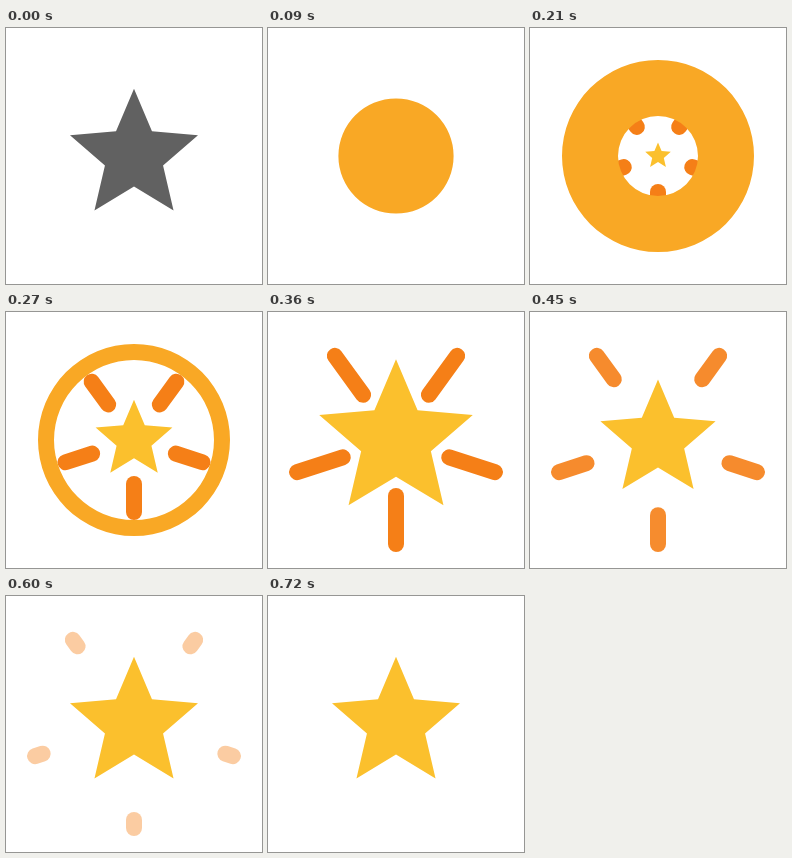
An HTML page with a canvas that plays this animation: 256x256 px, repeating every 1.24 s.

```html
<!DOCTYPE html>
<html lang="en">
<head>
<meta charset="utf-8">
<title>Star burst</title>
<style>
  html, body { margin: 0; height: 100%; overflow: hidden; background: #fff; }
  canvas { display: block; width: 100vw; height: 100vh; }
</style>
</head>
<body>
<canvas id="stage"></canvas>
<script>
const LOOP = 1240, STEP = 30, SIZE = 256;
const canvas = document.getElementById('stage');
const ctx = canvas.getContext('2d');
const starPath = new Path2D('M12 17.27L18.18 21l-1.64-7.03L22 9.24l-7.19-.61L12 2 9.19 8.63 2 9.24l5.46 4.73L5.82 21z');

// Linear track through [time, value] pairs, held at both ends
function track(t, ...keys) {
  if (t <= keys[0][0]) return keys[0][1];
  for (let i = 1; i < keys.length; i++) {
    const [t0, v0] = keys[i - 1], [t1, v1] = keys[i];
    if (t < t1) return v0 + (v1 - v0) * (t - t0) / (t1 - t0);
  }
  return keys[keys.length - 1][1];
}

function star(scale, color) {
  if (scale <= 0) return;
  ctx.save();
  ctx.scale(6.4 * scale, 6.4 * scale);
  ctx.translate(-12, -12.5);
  ctx.fillStyle = color;
  ctx.fill(starPath);
  ctx.restore();
}

function rays(inner, outer, alpha) {
  ctx.save();
  ctx.globalAlpha = alpha;
  ctx.strokeStyle = '#f57f17';
  ctx.lineWidth = 16;
  ctx.lineCap = 'round';
  for (let i = 0; i < 5; i++) {
    ctx.beginPath();
    ctx.moveTo(0, inner);
    ctx.lineTo(0, outer);
    ctx.stroke();
    ctx.rotate(Math.PI * 2 / 5);
  }
  ctx.restore();
}

function ring(outer, inner) {
  if (inner >= outer) return;
  ctx.beginPath();
  ctx.arc(0, 0, outer, 0, Math.PI * 2);
  ctx.moveTo(inner, 0);
  ctx.arc(0, 0, inner, 0, Math.PI * 2, true);
  ctx.fillStyle = '#f9a825';
  ctx.fill();
}

function draw(t) {
  const ratio = devicePixelRatio || 1;
  const w = Math.round(innerWidth * ratio), h = Math.round(innerHeight * ratio);
  if (canvas.width !== w || canvas.height !== h) {
    canvas.width = w;
    canvas.height = h;
  }
  ctx.setTransform(1, 0, 0, 1, 0, 0);
  ctx.clearRect(0, 0, w, h);
  ctx.setTransform(w / SIZE, 0, 0, h / SIZE, w / 2, h / 2);

  star(track(t, [0, 1], [150, 0]), '#616161');
  if (t >= 180 && t < 720) {
    rays(
      track(t, [180, 32], [360, 56], [548, 96]),
      track(t, [180, 40], [360, 104]),
      track(t, [420, 1], [720, 0])
    );
  }
  star(track(t, [180, 0], [360, 1.2], [480, 0.8], [600, 1]), '#fbc02d');
  ring(track(t, [0, 0], [150, 96]), track(t, [150, 0], [300, 100]));
}

function frame() {
  const t = performance.now() % LOOP;
  draw(Math.floor(t / STEP) * STEP);
  requestAnimationFrame(frame);
}
frame();
</script>
</body>
</html>
```
